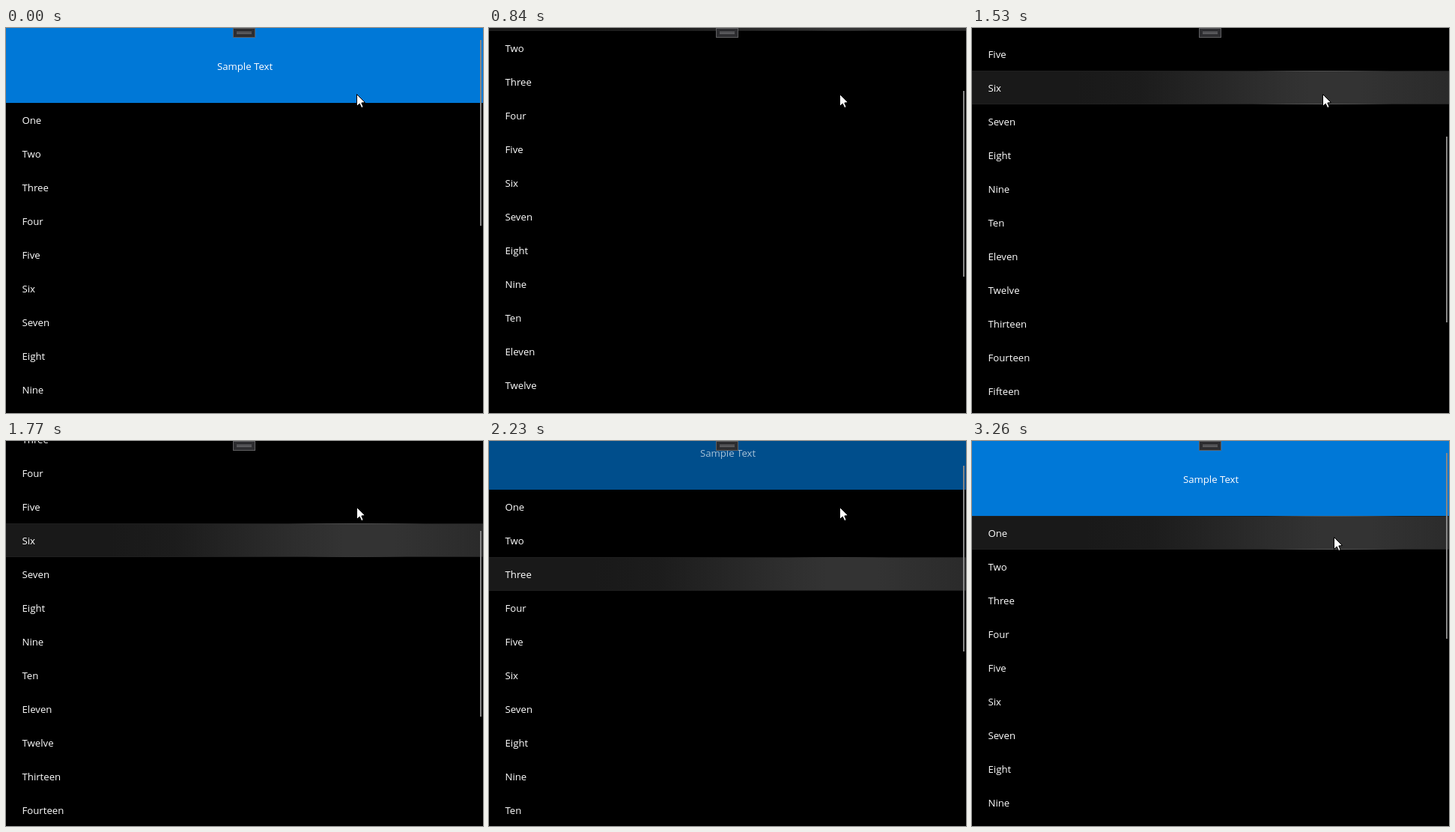
These frames come from a looping animation (637x514 px, 3330 ms). An HTML page with a canvas:

```html
<!DOCTYPE html>
<html lang="en">
<head>
<meta charset="utf-8">
<title>Scrolling list</title>
<style>
  html, body { margin: 0; width: 100%; height: 100%; overflow: hidden; background: #000; }
  canvas { display: block; }
</style>
</head>
<body>
<canvas id="stage" width="637" height="514"></canvas>
<script>
const W = 637, H = 514, LOOP = 3330;
const HEADER = 100, ROW = 45;
const FONT = '13.2px "Open Sans", "Noto Sans", sans-serif';
const ROWS = ['One', 'Two', 'Three', 'Four', 'Five', 'Six', 'Seven', 'Eight', 'Nine', 'Ten',
  'Eleven', 'Twelve', 'Thirteen', 'Fourteen', 'Fifteen', 'Sixteen', 'Seventeen', 'Eighteen',
  'Nineteen', 'Twenty'];
const TRACK = (H - 32) / (HEADER + ROW * ROWS.length);

// The picture advances in steps; scroll keys are [step, offset].
const FIRST = 526, STEP = 77.2;
const SCROLL = [[-1, 0], [4, 141], [9, 222], [13, 268], [19, 123], [22, 35], [26, 0]];
// Hovered row from a given step on; it lags behind the scrolling.
const HOVER = [[1, 0], [7, 3], [12, 5], [20, 2], [24, -1]];

const ctx = document.getElementById('stage').getContext('2d');

function slope(i) {
  const a = SCROLL[i - 1], b = SCROLL[i], c = SCROLL[i + 1];
  if (!a || !c || (b[1] - a[1]) * (c[1] - b[1]) <= 0) return 0;
  return (c[1] - a[1]) / (c[0] - a[0]);
}

function scrollAt(step) {
  const i = SCROLL.findIndex(key => key[0] > step) - 1;
  if (i < 0) return 0;
  const [x0, y0] = SCROLL[i], [x1, y1] = SCROLL[i + 1];
  const d = x1 - x0, u = (step - x0) / d, v = 1 - u;
  return Math.round(
    y0 * v * v * (1 + 2 * u) + y1 * u * u * (3 - 2 * u) +
    d * u * v * (slope(i) * v - slope(i + 1) * u));
}

function hoverAt(step) {
  let row = -1;
  for (const [from, index] of HOVER) if (step >= from) row = index;
  return row;
}

function pointerAt(t) {
  const n = t < 3090 ? 0 : t < 3175 ? 1 : t < 3258 ? 2 : 3;
  return { x: 468 + 5 * n, y: Math.round(88 + 40 * n / 3) };
}

function rect(color, x, y, w, h) {
  ctx.fillStyle = color;
  ctx.fillRect(x, y, w, h);
}

function label(text, x, y, align) {
  ctx.textAlign = align;
  ctx.fillStyle = '#fff';
  ctx.fillText(text, x, y);
}

function drawHeader(scroll) {
  if (scroll >= HEADER) return;
  ctx.globalAlpha = 1 - scroll / HEADER;
  rect('#0078d7', 0, -scroll, W, HEADER);
  label('Sample Text', 319, 56 - scroll, 'center');
  ctx.globalAlpha = 1;
}

function drawHover(y, p) {
  const glow = ctx.createLinearGradient(p.x - 330, 0, p.x + 350, 0);
  glow.addColorStop(0, '#191919');
  glow.addColorStop(0.13, '#1c1c1c');
  glow.addColorStop(0.36, '#2d2d2d');
  glow.addColorStop(0.46, '#333');
  glow.addColorStop(0.56, '#333');
  glow.addColorStop(0.74, '#2a2a2a');
  glow.addColorStop(1, '#191919');
  rect(glow, 0, y, W, ROW);

  const edge = ctx.createRadialGradient(p.x, p.y, 0, p.x, p.y, 95);
  edge.addColorStop(0, '#5c5c5c');
  edge.addColorStop(0.5, '#464646');
  edge.addColorStop(1, '#1f1f1f');
  rect(edge, 0, y, W, 1);
  rect(edge, 0, y + ROW - 1, W, 1);
}

function drawHandle() {
  rect('#2d2d30', 303, 0, 30, 13);
  ctx.strokeStyle = '#606062';
  ctx.lineWidth = 1;
  ctx.strokeRect(303.5, 0.5, 29, 12);
  rect('#77777a', 308, 5, 20, 1);
  rect('#77777a', 308, 7, 20, 1);
}

function drawPointer(p) {
  ctx.save();
  ctx.translate(p.x + 0.5, p.y + 0.5);
  ctx.beginPath();
  for (const [x, y] of [[0, 0], [0, 16], [3.7, 12.5], [6.2, 18], [8.7, 17], [6.3, 11.5], [11, 11]]) {
    ctx.lineTo(x, y);
  }
  ctx.closePath();
  ctx.fillStyle = '#fff';
  ctx.fill();
  ctx.strokeStyle = '#000';
  ctx.lineWidth = 1;
  ctx.stroke();
  ctx.restore();
}

function draw(t) {
  const step = Math.floor((t - FIRST) / STEP);
  const scroll = scrollAt(step);
  const p = pointerAt(t);
  const hover = p.y > HEADER ? 0 : hoverAt(step);

  rect('#000', 0, 0, W, H);
  ctx.font = FONT;
  ctx.textBaseline = 'alphabetic';
  drawHeader(scroll);
  ROWS.forEach((text, i) => {
    const y = HEADER + ROW * i - scroll;
    if (y <= -ROW || y >= H) return;
    if (i === hover) drawHover(y, p);
    label(text, 21.5, y + 28, 'left');
  });
  rect('#868686', 633, 16 + Math.round(scroll * TRACK), 2, 248);
  drawHandle();
  drawPointer(p);
}

let start;
function tick(now) {
  start ??= now;
  draw((now - start) % LOOP);
  requestAnimationFrame(tick);
}
draw(0);
requestAnimationFrame(tick);
</script>
</body>
</html>
```
